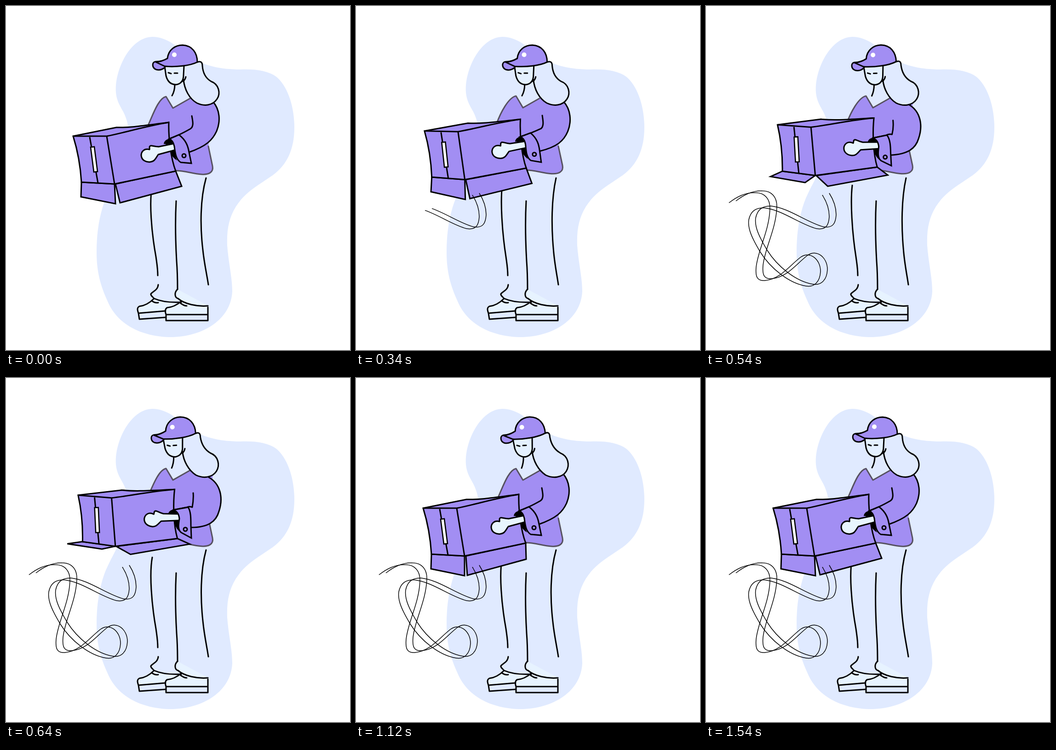
An HTML page for the animation above (1560 ms loop, 748x748 px).

```html
<!DOCTYPE html>
<html lang="en">
<head>
<meta charset="utf-8">
<title>Parcel carrier</title>
<style>
html, body { margin: 0; width: 100%; height: 100%; overflow: hidden; background: #fff; }
svg { display: block; width: 100vw; height: 100vh; }
.line { fill: none; stroke: #000; stroke-width: 3; stroke-linecap: round; stroke-linejoin: round; }
.box { fill: #a28ef3; stroke: #000; stroke-width: 3; stroke-linejoin: miter; }
.purple { fill: #a28ef3; }
.pale { fill: #e0eaff; }
.shoe { fill: #e7f3ff; }
.hem { stroke: #56515f; }
.trail { fill: none; stroke: #000; stroke-width: 1.5; }
</style>
</head>
<body>
<svg viewBox="0 0 748 748">
  <path class="pale" d="M318 67C350 67 375 90 395 108C430 130 465 138 510 138C545 137 570 141 588 154C612 174 627 217 627 264C627 310 612 345 580 368C545 392 520 405 500 436C484 462 480 488 481 520C484 560 492 590 492 620C490 680 430 720 356 720C290 718 240 690 220 640C202 600 197 570 197 534C197 490 204 450 217 418C233 382 253 352 262 320C272 290 268 255 255 230C245 212 237 200 239 172C243 125 275 68 318 67Z"/>

  <g class="line">
    <path id="legL"/>
    <path d="M370 424C367 480 369 520 371 555C373 580 373 600 373 617"/>
    <path id="legR"/>
  </g>

  <path class="shoe" d="M322 636C312 646 300 652 290 653C284 656 286 662 288 668L347 663L381 644C360 645 340 644 322 636Z"/>
  <path class="shoe" d="M373 616L440 652V671H348C346 665 345 660 350 656C362 655 372 650 381 642L374 636C366 634 366 622 373 616Z"/>
  <g class="line">
    <path d="M331 606C330 618 320 620 315 626C314 630 320 633 322 636C340 644 360 645 381 644"/>
    <path d="M322 636C312 646 300 652 290 653C284 656 286 662 288 668L347 663M288 668L290 681L347 677"/>
    <path d="M317 641C322 645 326 646 331 645"/>
    <path d="M373 616C366 622 366 634 374 636C388 648 415 654 439 652"/>
    <path d="M381 642C372 650 362 655 350 656C345 660 346 665 348 671H438M348 671V684H439V655"/>
    <path d="M378 645C384 650 388 652 393 652"/>
  </g>

  <path class="purple" id="torso"/>
  <path class="line hem" id="collar"/>
  <path class="line hem" id="hem"/>

  <g id="box">
    <path class="box" id="flapL"/>
    <path class="box" id="flapR"/>
    <path class="box" d="M146 283L240 264C270 265 300 260 354 253C353 285 358 330 369 359L236 387L164 383C162 350 156 315 146 283Z"/>
    <path class="box" style="fill:none" d="M146 283L219 283C260 275 300 262 354 253M219 283L236 387M182 285L200 385"/>
    <path class="box" style="fill:#fff;stroke-width:2.6" d="M184 307L192 306L199 360L191 361Z"/>
  </g>

  <g id="trails">
    <path class="trail" id="trailA" pathLength="1"/>
    <path class="trail" id="trailB" pathLength="1" transform="translate(15 -4)"/>
  </g>

  <path class="purple" id="sleeve"/>
  <path class="line" id="outer"/>
  <path class="line" id="inner"/>
  <path id="hole"/>
  <path id="hand" class="line" style="fill:#e8f5fe" d="M366 299L332 306C322 306 318 303 314 304C310 306 313 310 312 312C300 309 294 317 294 325C295 336 305 340 314 339C324 338 326 330 331 323L368 313"/>
  <path class="box" id="cuff"/>
  <circle class="line" id="button" r="4"/>

  <path class="line" id="neck"/>
  <path class="line" id="hair" style="fill:#e0eaff"/>
  <g id="head">
    <path class="line" style="fill:#e4f0ff" d="M345 131L348 152C352 167 361 171 370 171C382 169 386 160 386 150L387 131"/>
    <path class="line" d="M391 154C390 160 387 162 385 164M353 145L359 147M366 146L373 146"/>
    <path class="line" style="fill:#a28ef3" d="M351 114C340 121 330 121 325 121C317 122 317 134 326 138C336 141 344 136 347 131Z"/>
    <path class="line" style="fill:#a28ef3" d="M351 114C353 95 368 85 384 85C405 86 416 102 416 122C400 130 370 133 345 131L326 122C336 121 344 118 351 114Z"/>
    <circle cx="366" cy="106" r="5" fill="#fff"/>
  </g>
</svg>
<script>
const LOOP = 1560, STEP = 20;
const el = id => document.getElementById(id);
const set = (id, name, value) => el(id).setAttribute(name, value);
const clamp = x => Math.max(0, Math.min(1, x));
const ease = x => { x = clamp(x); return x * x * (3 - 2 * x); };
const hump = (t, start, length) => {
  const x = (t - start) / length;
  return x > 0 && x < 1 ? Math.sin(Math.PI * x) ** 2 : 0;
};

// Piecewise linear value through [time, value] pairs
function track(t, keys) {
  for (let i = 1; i < keys.length; i++) {
    const [t0, v0] = keys[i - 1], [t1, v1] = keys[i];
    if (t <= t1) return v0 + (v1 - v0) * clamp((t - t0) / (t1 - t0));
  }
  return keys[keys.length - 1][1];
}

// Blends paths of equal structure: rest pose plus weighted differences
const numbers = d => d.match(/-?[\d.]+/g).map(Number);
function blend(poses, weights) {
  const [rest, ...others] = poses.map(numbers);
  let i = 0;
  return poses[0].replace(/-?[\d.]+/g, () => {
    const v = others.reduce((sum, p, k) => sum + weights[k] * (p[i] - rest[i]), rest[i]);
    i++;
    return v.toFixed(2);
  });
}

// Each arm path: rest, high lift, low lift
const arm = {
  outer: [
    "M450 208C465 225 467 250 458 272C449 292 435 305 398 318",
    "M456 207C474 222 478 253 470 276C462 300 445 312 404 307",
    "M441 216C466 230 473 260 463 290C457 312 440 325 402 325"],
  inner: [
    "M404 239C406 250 409 262 401 267C394 271 385 276 376 280L355 289",
    "M409 234C409 245 409 255 409 264C405 263 398 262 393 262L365 267",
    "M407 250C408 262 407 270 405 281C400 279 396 280 394 281L363 287"],
  hole: [
    "M343 300C344 292 352 287 360 291C368 298 366 325 372 336C362 330 357 320 356 312C352 300 348 300 343 300Z",
    "M357 276C360 267 368 264 374 268C382 278 375 300 382 320C374 312 370 300 371 292C368 276 362 276 357 276Z",
    "M353 295C355 287 364 284 371 289C379 296 373 318 380 336C371 330 367 320 367 312C364 296 358 295 353 295Z"],
  cuff: [
    "M355 289L376 280C392 292 396 306 398 318L403 342L380 340C370 334 368 322 366 305C364 296 360 291 355 289Z",
    "M365 267L393 261C402 272 404 285 404 300L402 331L381 320C375 313 377 300 379 288C379 276 374 268 365 267Z",
    "M363 287L396 281C402 290 402 305 402 320L403 348L381 336C373 330 375 318 377 306C376 295 372 289 363 287Z"]
};

// Body parts: rest, swayed
const body = {
  collar: [
    "M310 257C320 235 332 200 348 197L363 222L400 201",
    "M303 257C312 229 332 198 348 195L363 221L398 201"],
  hem: [
    "M440 305L449 348C452 362 440 367 425 366C405 365 390 358 369 358",
    "M440 305L449 346C452 360 440 365 425 364C405 363 390 356 369 356"],
  legL: [
    "M318 390C311 425 316 490 326 545C328 560 330 570 330 586",
    "M318 390C315 425 318 490 326 545C328 560 330 570 330 586"],
  legR: [
    "M435 374C422 420 422 480 428 530C431 560 437 585 440 606",
    "M435 374C426 420 426 480 430 530C432 560 437 585 440 606"]
};
const hair = [
  "M416 122C425 119 427 124 427 130C428 144 434 157 446 164C463 170 467 190 459 202C450 216 432 219 415 211C399 202 388 182 386 160",
  "M411 120C419 116 421 122 421 128C424 144 432 156 444 163C462 170 465 190 457 203C448 217 428 219 412 211C396 200 385 180 383 160"];
const neck = ["M367 171C367 180 365 188 361 195", "M364 172C364 181 363 188 360 196"];
const trail = "M50 428C70 412 90 405 108 406C128 406 140 420 139 442C137 490 113 530 109 568C107 590 112 598 128 597C162 594 182 564 206 546C225 532 249 550 249 577C248 600 235 612 218 609C180 603 140 570 118 535C102 508 90 485 93 465C97 445 110 438 127 439C165 443 205 475 240 484C262 488 267 475 268 458C268 440 262 425 253 411";
set("trailA", "d", trail);
set("trailB", "d", trail);

// Flap poses: hanging, swung open, swung shut
const flapL = [
  "M164 383L236 387L238 430L163 415Z",
  "M164 383L236 387L207 395L131 390Z",
  "M164 383L236 387L236 430L163 415Z"];
const flapR = [
  "M238 387L369 359L382 392L248 428Z",
  "M238 387L369 359L397 368.5L270.5 401.5Z",
  "M239 387L369 359L370 394L242 429Z"];

const openKeys = [[0, 0], [340, 0], [440, .34], [620, 1.06], [800, .4], [960, 0], [1180, 0], [1340, .2], [1520, 0]];
const shutKeys = [[0, 0], [930, 0], [1050, 1], [1130, 1], [1300, 0]];

function draw(t) {
  const high = hump(t, 0, 400), low = hump(t, 400, 400) / .905;
  const w = [high, low];
  const mix = (a, b) => a * high + b * low;

  set("box", "transform",
    `translate(${mix(9.5, 7)} ${mix(-44.4, -19.9)}) rotate(${mix(6, 4.8)} 248 324.7)`);
  const swing = [track(t, openKeys), track(t, shutKeys)];
  set("flapL", "d", blend(flapL, swing));
  set("flapR", "d", blend(flapR, swing));

  const sway = [hump(t, 180, 520)];
  for (const id in body) set(id, "d", blend(body[id], sway));
  set("torso", "d", blend(body.collar, sway) + "L450 208" + blend(body.hem, sway).replace("M", "L") + "L340 340Z");

  for (const id in arm) set(id, "d", blend(arm[id], w));
  const inside = blend(arm.inner, w);
  set("sleeve", "d", blend(arm.outer, w) + "L" + inside.split("L")[1] +
    "L" + numbers(inside).slice(6, 8).join(" ") + "L" + numbers(inside).slice(0, 2).join(" ") + "Z");
  set("hand", "transform",
    `translate(${mix(9, 7)} ${mix(-38, -16)}) rotate(${mix(14.5, 13)} 312 322)`);
  set("button", "cx", 387 + mix(4, 3));
  set("button", "cy", 325.5 + mix(-14.5, 3.5));

  const nod = ease((t - 240) / 600) - ease((t - 1040) / 500);
  set("head", "transform", `translate(0 ${nod * .4}) rotate(${-3.7 * nod} 372 196)`);
  set("hair", "d", blend(hair, [nod]));
  set("neck", "d", blend(neck, [nod]));

  const drawn = clamp((t - 320) / 100);
  el("trails").style.visibility = drawn > 0 ? "visible" : "hidden";
  for (const id of ["trailA", "trailB"]) {
    set(id, "stroke-dasharray", drawn < 1 ? "1 1" : "none");
    set(id, "stroke-dashoffset", drawn - 1);
  }
}

const begin = performance.now();
function tick() {
  const t = (performance.now() - begin) % LOOP;
  draw(Math.floor(t / STEP) * STEP);
  requestAnimationFrame(tick);
}
draw(0);
requestAnimationFrame(tick);
</script>
</body>
</html>
```
